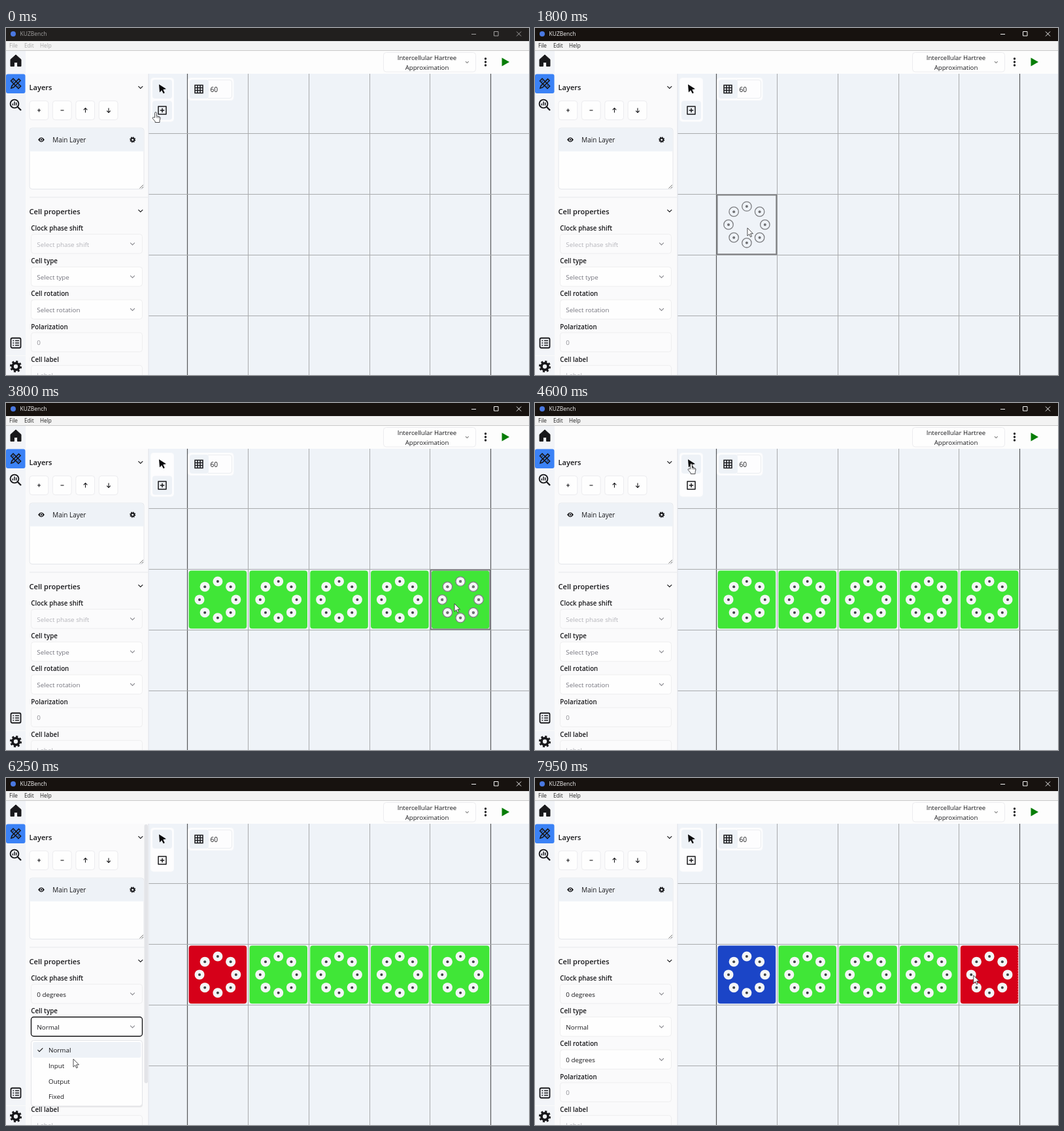
An HTML page that plays this animation: 800 px wide and 531 px high, repeating every 8000 ms.

```html
<!DOCTYPE html>
<html lang="en">
<head>
<meta charset="utf-8">
<title>Cell editor</title>
<style>
html, body { margin: 0; width: 100%; height: 100%; overflow: hidden; background: #fff; }
svg { display: block; width: 100vw; height: 100vh; }
text { font-family: "Open Sans", "Noto Sans", sans-serif; white-space: pre; }
</style>
</head>
<body>
<svg id="stage" viewBox="0 0 800 531"></svg>
<script>
const LOOP = 8000, STEP = 50;
const PITCH = 92.8, GRID_X = 277.6, GRID_Y = 161.7;
const INK = '#18181b', TINT = '#eef2f7', CANVAS = '#eff3f8';
const GREEN = '#40e637', RED = '#d60019', BLUE = '#1b45c7';

// Moments at which the interface changes state
const AT = {
  insert: 200, drag: 1750, fourth: 2650, place: 3800, pick: 4550, select: 5200,
  open: 5950, hoverInput: 6300, choose: 6650, reselect: 7700, hideBar: 7550
};

// Pointer path: time, x, y
const PATH = [
  [0, 229, 129], [150, 236, 127], [300, 240, 126], [800, 375, 275], [850, 374, 283],
  [1350, 322, 306], [1750, 322, 306], [2550, 585, 300], [2600, 585, 300],
  [2700, 604, 307], [2850, 618, 309], [2950, 618, 309], [3500, 694, 308],
  [3750, 694, 308], [3800, 686, 307], [4500, 240, 94], [4600, 239, 93],
  [4700, 239, 93], [5150, 318, 296], [5250, 318, 296], [5500, 174, 344],
  [5550, 133, 365], [5800, 114, 380], [5950, 114, 380], [6250, 103, 430],
  [6450, 88, 440], [6600, 88, 440], [7450, 640, 308], [7500, 640, 308],
  [7700, 668, 303], [8000, 671, 302]
];

const range = n => [...Array(n).keys()];
const rect = (x, y, w, h, fill, more = '') =>
  `<rect x="${x}" y="${y}" width="${w}" height="${h}" fill="${fill}" ${more}/>`;
const box = (x, y, w, h, fill = '#fefefe', stroke = '#ececef', more = '') =>
  rect(x, y, w, h, fill, `rx="4" stroke="${stroke}" ${more}`);
const line = (d, color = INK, width = 1, more = '') =>
  `<path d="${d}" fill="none" stroke="${color}" stroke-width="${width}" ${more}/>`;
const shape = (d, fill, more = '') => `<path d="${d}" fill="${fill}" ${more}/>`;
const dot = (x, y, r, fill, more = '') =>
  `<circle cx="${x}" cy="${y}" r="${r}" fill="${fill}" ${more}/>`;
const label = (x, y, s, size = 9.84, fill = INK, more = '') =>
  `<text x="${x}" y="${y}" font-size="${size}" fill="${fill}" ${more}>${s}</text>`;
const group = (id, body, more = '') => `<g id="${id}" ${more}>${body}</g>`;
const chevron = (x, y, color = INK, r = 3.4, w = 1.1) =>
  line(`M${x - r} ${y - r / 2}l${r} ${r}l${r} ${-r}`, color, w);
const BOLD = 'font-weight="600"';

function gear(x, y, s) {
  const tooth = 2 * Math.PI * s * 0.84 / 16;
  return dot(x, y, s * 0.56, 'none', `stroke="${INK}" stroke-width="${s * 0.42}"`) +
    dot(x, y, s * 0.84, 'none',
      `stroke="${INK}" stroke-width="${s * 0.34}" stroke-dasharray="${tooth}"`);
}

function titleBar() {
  return rect(0, 0, 800, 20, '#17120f', 'id="bar"') + dot(11, 9, 4, '#4a78e0') +
    group('caption',
      label(21.5, 12, 'KUZBench', 8.5, 'currentColor') +
      line('M712 9.5h7M746.5 5.5h6.5v6.5h-6.5zM781 5.5l7 7m0-7l-7 7', 'currentColor', 1)) +
    rect(0, 20, 800, 14, '#f3f3f3') + rect(0, 34, 800, 1, '#c9c9c9') +
    group('menu', ['File', 'Edit', 'Help'].map((s, i) =>
      label([5, 28, 52][i], 30, s, 8.2, 'currentColor')).join(''));
}

function topBar() {
  return rect(30, 35, 770, 35, '#fdfdfd') + box(577.5, 37.5, 141, 29.5) +
    label(644, 49, 'Intercellular Hartree', 9.65, INK, 'text-anchor="middle"') +
    label(644, 64, 'Approximation', 9.65, INK, 'text-anchor="middle"') +
    chevron(705.3, 52.3, '#888', 2.4) +
    [47, 52, 57].map(y => dot(733.5, y, 1.7, INK)).join('') +
    shape('M758.5 45.5L770 52L758.5 58.5Z', '#087d08');
}

function sideBar() {
  return rect(0, 35, 30, 496, '#f2f4f8') +
    shape('M15 41L23 48.3V58.5H17.6V52.5H12.4V58.5H7V48.3Z', INK,
      `stroke="${INK}" stroke-linejoin="round"`) +
    rect(0, 70.5, 29.5, 29.5, '#3b82f6', 'rx="3"') +
    line('M8 92L9 88.5L19.5 78L22 80.5L11.5 91Z', INK, 1.7) +
    line('M7.5 81L11 77.5L22.5 89L19 92.5Z', INK, 1.7) +
    line('M10.5 82l1.4-1.4M18 89.5l1.4-1.4', INK, 1.2) +
    dot(13, 116, 6.4, 'none', `stroke="${INK}" stroke-width="1.9"`) +
    line('M17.8 120.8L23 126', INK, 2.3) +
    line('M10.3 118.5V115.5M13 118.5V112.5M15.7 118.5V114', INK, 1.5) +
    box(7.5, 474.5, 15, 15, 'none', INK, 'stroke-width="1.8" style="rx:2px"') +
    line('M10.3 478.5h2M14 478.5h6M10.3 482h2M14 482h6M10.3 485.5h2M14 485.5h6', INK, 1.5) +
    rect(0, 501, 30, 1, '#fafafa') + gear(15, 518, 9);
}

function field(i, id, hint, arrow, soft) {
  const y = 315.5 + i * 50.2;
  return box(38.5, y, 170, 29.5, soft ? '#fbfbfc' : '#fefefe', '#eeeeef', `id="${id}Box"`) +
    label(47.3, y + 19, hint, 9.84, '#777780', `id="${id}"`) +
    (arrow ? chevron(193.5, y + 14.8, '#8c8c92') : '');
}

function panel() {
  const icons = ['M48 126h5M50.5 123.5v5', 'M83.5 126h5',
    'M121.5 129.5v-7m-2.8 2.8l2.8-2.8l2.8 2.8', 'M157 122.5v7m-2.8-2.8l2.8 2.8l2.8-2.8'];
  const names = ['Clock phase shift', 'Cell type', 'Cell rotation', 'Polarization', 'Cell label'];
  return rect(30, 70, 188, 461, '#fafafb') +
    label(35.5, 95, 'Layers', 11.1, INK, BOLD) + chevron(205.8, 90.8) +
    icons.map((d, i) => box(36 + i * 35.4, 111.5, 28.8, 29) + line(d, INK, 1.1)).join('') +
    box(36, 153, 175, 93.5, '#fefefe', '#e4e6ea') +
    shape('M36.5 188.8V157q0-3.5 3.5-3.5H207q3.5 0 3.5 3.5V188.8Z', TINT) +
    shape('M49 171Q54 164.2 59 171Q54 177.8 49 171Z', INK) +
    dot(54, 171, 2.2, TINT) + dot(54, 171, 1.2, INK) +
    label(71.3, 174.7, 'Main Layer', 9.95, INK, 'font-weight="500"') + gear(193.7, 171, 4.5) +
    line('M204.5 245.5l5.5-5.5m-2.5 5.5l2.5-2.5', '#666', 0.9) +
    rect(36, 258.5, 181, 1, '#e8e9ec') +
    label(35.5, 284.6, 'Cell properties', 11.1, INK, BOLD) + chevron(205.8, 279.8) +
    names.map((s, i) => label(38.3, 310 + i * 50.2, s, 9.78, INK, BOLD)).join('') +
    field(0, 'phase', 'Select phase shift', true, true) +
    field(1, 'type', 'Select type', true) +
    field(2, 'turn', 'Select rotation', true) +
    field(3, 'polar', '0', false, true) + field(4, 'tag', 'Label', false, true) +
    rect(217.5, 70, 1, 461, '#dfe2e8') +
    rect(211.5, 71, 5.5, 396, '#e3e4e8', 'id="scroll" rx="2.7"');
}

function dropdown() {
  return group('list',
    rect(39, 403, 170, 101, '#000', 'rx="4" opacity=".07"') +
    box(38.5, 401.5, 170, 100.5, '#fefefe', '#e2e3e7') +
    rect(41, 404, 165.5, 24, TINT, 'id="option" rx="3"') +
    line('M48.5 416l2.5 2.7l5.3-5.3', INK, 1.1) +
    ['Normal', 'Input', 'Output', 'Fixed'].map((s, i) =>
      label(65, 420.3 + i * 23.7, s)).join(''));
}

function toolbar() {
  return box(221.5, 76.5, 35, 66.5, '#fdfdfe', '#fafbfc') +
    rect(224, 79, 30, 29, TINT, 'id="pickBtn" rx="4"') +
    rect(224, 111.5, 30, 29, TINT, 'id="insertBtn" rx="4"') +
    shape('M234 86.2L245 93.3L240.3 94.3L242.8 99.3L240.7 100.3L238.2 95.3L235 98.6Z', '#09090b') +
    line('M233 120h12v12h-12zM239 122.7v6.6M235.7 126h6.6', INK, 1.5, 'stroke-linejoin="round"') +
    box(278.5, 76.5, 69.5, 34, '#fdfdfe', '#fafbfc') +
    rect(281, 79, 29, 29, TINT, 'rx="4"') +
    line('M309 79.5h33q3.5 0 3.5 3.5v21q0 3.5-3.5 3.5h-33', '#ebedf0', 1) +
    line('M289 87.5h12v12h-12zM293 87.5v12M297 87.5v12M289 91.5h12M289 95.5h12', INK, 1.5) +
    label(312.5, 97.7, '60', 10.1);
}

function canvas() {
  const cols = range(6).map(i => line(`M${Math.round(GRID_X + i * PITCH - 0.5) + 0.5} 70V531`,
    i % 5 ? '#a9abad' : '#57585a', i % 5 ? 1 : 1.2));
  const rows = range(4).map(i =>
    line(`M218 ${Math.round(GRID_Y + i * PITCH - 0.5) + 0.5}H800`, '#a9abad', 1));
  return rect(218, 70, 582, 461, CANVAS) + cols.join('') + rows.join('') +
    '<g id="cells" clip-path="url(#view)"></g>';
}

function rings(x, y, r, style, ink) {
  return range(8).map(i => {
    const a = i * Math.PI / 4;
    const cx = x + 27.9 * Math.cos(a), cy = y + 27.9 * Math.sin(a);
    return `<circle cx="${cx}" cy="${cy}" r="${r}" ${style}/>` + dot(cx, cy, 2, ink);
  }).join('');
}

const middle = (col, row) =>
  [GRID_X + (col + 0.5) * PITCH - 0.1, GRID_Y + (row + 0.5) * PITCH];

function solidCell(col, fill) {
  const [x, y] = middle(col, 1);
  return rect(x - 44.3, y - 44.3, 88.6, 88.6, fill, 'rx="4"') +
    rings(x, y, 7.5, 'fill="#f4f6f6"', '#3f4246');
}

function ghostCell(col, row) {
  const [x, y] = middle(col, row);
  return rect(x - 45.4, y - 45.4, 90.8, 90.8, 'none', 'stroke="#808184" stroke-width="2"') +
    rings(x, y, 7.2, 'fill="none" stroke="#7c7d80" stroke-width="1.3"', '#707174');
}

const stage = document.getElementById('stage');
stage.innerHTML = '<clipPath id="view">' + rect(218, 70, 582, 461, '#fff') + '</clipPath>' +
  canvas() + topBar() + sideBar() + panel() + toolbar() + titleBar() + dropdown() +
  group('arrow', shape('M0 0V12.2L2.8 9.5L4.7 13.8L6.6 13L4.7 8.8H8.5Z', '#fff',
    'stroke="#3a3a3d" stroke-width=".9" stroke-linejoin="round"')) +
  group('hand', shape('M-1.4 8V1.2a1.3 1.3 0 0 1 2.7 0V5.8l4 .8q1.9.5 1.7 2.4L6 12.8V15.5H-.8V14L-4.8 9.4q-.6-1.7 1.1-1.6Z',
    '#fff', 'stroke="#3a3a3d" stroke-width=".9" stroke-linejoin="round"') +
    line('M1.3 5.8v3M3.5 6.4v2.7M5.4 6.8v2.5', '#3a3a3d', 0.6));

const el = id => document.getElementById(id);
const show = (id, on) => el(id).setAttribute('display', on ? 'inline' : 'none');

function setText(id, s, color) {
  el(id).textContent = s;
  el(id).setAttribute('fill', color);
}

function pointer(t) {
  const i = PATH.findIndex(k => k[0] > t);
  const [t0, x0, y0] = PATH[i - 1], [t1, x1, y1] = PATH[i];
  const u = (t - t0) / (t1 - t0), e = u * u * (3 - 2 * u);
  return [x0 + (x1 - x0) * e, y0 + (y1 - y0) * e];
}

function drawCells(t, x, y) {
  const col = Math.floor((x - GRID_X) / PITCH), row = Math.floor((y - GRID_Y) / PITCH);
  let out = '';
  if (t >= AT.place) {
    const chosen = t >= AT.reselect ? 4 : t >= AT.select ? 0 : -1;
    out += range(5).map(i =>
      solidCell(i, i === chosen ? RED : i === 0 && chosen === 4 ? BLUE : GREEN)).join('');
  }
  if (t >= AT.drag && t < AT.place) {
    const last = t < AT.fourth ? Math.min(col, 2) : Math.max(col, 3);
    out += range(last + 1).map(i => ghostCell(i, 1)).join('');
  } else if (t >= AT.insert && t < AT.pick) {
    const blocked = x < 218 || y < 70 || (x < 257 && y < 143) || (x > 278 && x < 348 && y < 111);
    if (!blocked) out += ghostCell(col, row);
  }
  if (t >= AT.reselect)
    out += line('M738.5 262V341', '#fff', 0.8, 'stroke-dasharray="2 2" opacity=".4"');
  el('cells').innerHTML = out;
}

function render(time) {
  const t = Math.floor(time % LOOP / STEP) * STEP;
  const [x, y] = pointer(t);
  const active = t >= AT.insert, filled = t >= AT.select;
  const open = t >= AT.open && t < AT.choose;
  const input = t >= AT.choose && t < AT.reselect;
  const focus = t >= AT.open && t < AT.reselect;
  const overTool = x > 224 && x < 254 && y > 79 && y < 141;
  const inserting = t >= AT.insert && t < AT.pick;

  el('bar').setAttribute('fill', active ? '#17120f' : '#211f1e');
  el('caption').setAttribute('color', active ? '#f4f4f4' : '#a2a1a0');
  el('menu').setAttribute('color', active ? '#222' : '#a9a9a9');
  show('pickBtn', !inserting || (overTool && y < 109));
  show('insertBtn', inserting || (overTool && y > 111));

  setText('phase', filled ? '0 degrees' : 'Select phase shift', filled ? INK : '#b4b4ba');
  setText('type', filled ? (input ? 'Input' : 'Normal') : 'Select type', filled ? INK : '#777780');
  setText('turn', filled ? '0 degrees' : 'Select rotation', filled ? INK : '#777780');
  setText('polar', '0', '#8c8c92');
  setText('tag', 'Label', input ? '#777780' : '#b4b4ba');
  el('typeBox').setAttribute('stroke', focus ? INK : '#eeeeef');
  el('typeBox').setAttribute('stroke-width', focus ? 1.4 : 1);
  show('list', open);
  el('option').setAttribute('y', t >= AT.hoverInput ? 427.7 : 404);
  show('scroll', t >= AT.open && t < AT.hideBar);

  drawCells(t, x, y);
  show('hand', overTool);
  show('arrow', !overTool);
  el(overTool ? 'hand' : 'arrow').setAttribute('transform', `translate(${x} ${y})`);
}

const start = performance.now();
function tick() {
  render(performance.now() - start);
  requestAnimationFrame(tick);
}
tick();
</script>
</body>
</html>
```
